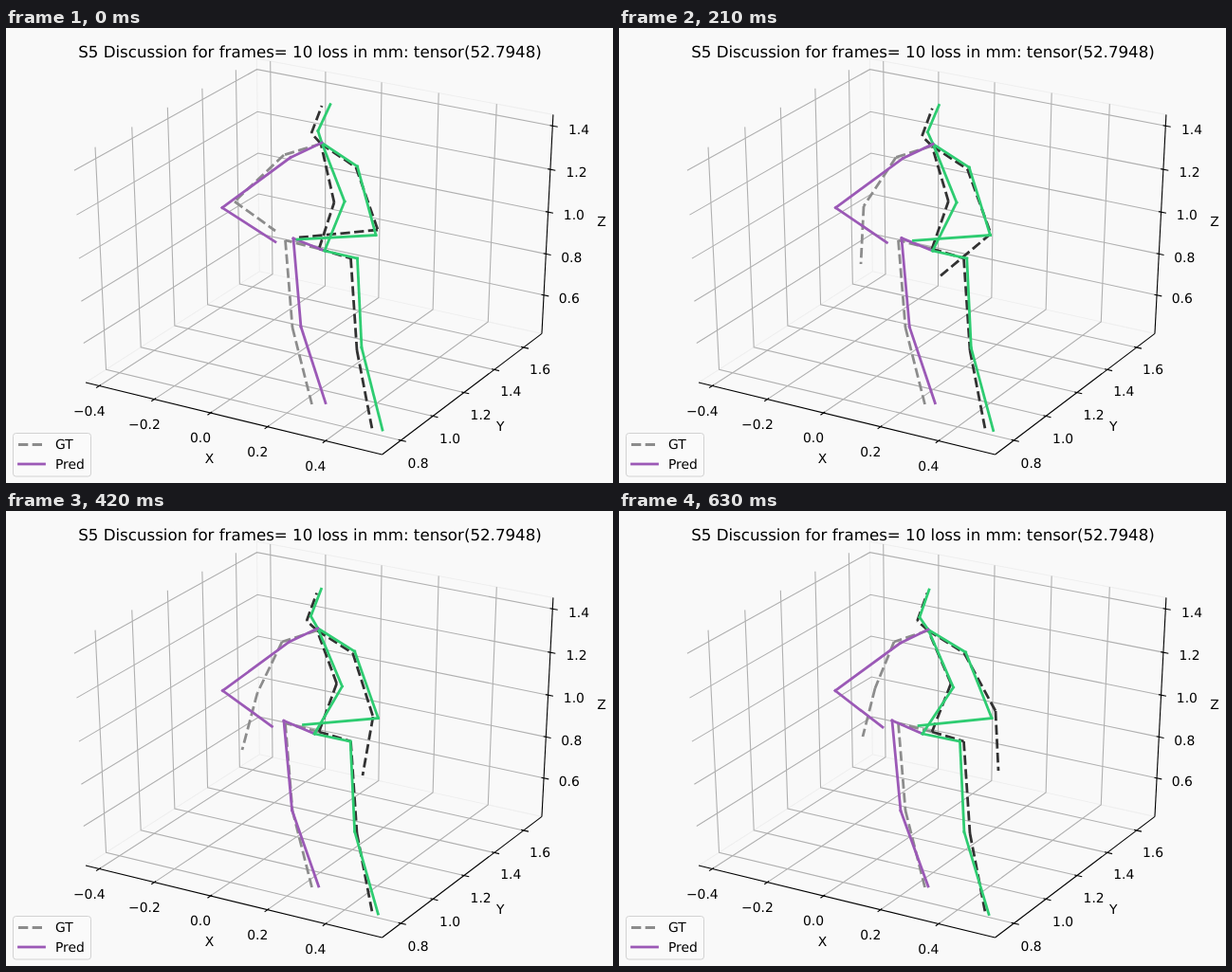
Write an HTML page that moves like this. It is 640 by 480 pixels and loops after 700 ms.

```html
<!DOCTYPE html>
<html lang="en">
<head>
<meta charset="utf-8">
<title>Pose comparison</title>
<style>
html, body { margin: 0; height: 100%; overflow: hidden; background: #f9f9f9; }
svg { display: block; font: 13.89px "DejaVu Sans", sans-serif; text-rendering: geometricPrecision; }
path { fill: none; stroke-width: 1.1; }
.c { text-anchor: middle; }
.bone { stroke-width: 2.78; stroke-linecap: square; }
.dash { stroke-linecap: butt; stroke-dasharray: 10.3 4.4; }
</style>
</head>
<body>
<svg width="640" height="480" viewBox="0 0 640 480">
  <g id="axes"></g>
  <g id="bones"></g>
  <text class="c" x="320.5" y="31" font-size="16.67">S5 Discussion for frames= 10 loss in mm: tensor(52.7948)</text>
  <rect x="7.5" y="427.5" width="82" height="45.5" rx="3" fill="#fafafa" stroke="#d2d2d2"/>
  <path class="bone dash" stroke="#8c8c8c" d="M13 439.5H41"/>
  <path class="bone" stroke="#9b59b6" d="M13.5 460H40.5"/>
  <text x="52" y="444">GT</text>
  <text x="52" y="465">Pred</text>
</svg>
<script>
const axes = document.getElementById('axes'), boneLayer = document.getElementById('bones');
function add(parent, tag, attrs, text = '') {
  const el = document.createElementNS('http://www.w3.org/2000/svg', tag);
  for (const k in attrs) el.setAttribute(k, attrs[k]);
  el.textContent = text;
  parent.append(el);
  return el;
}

// Perspective view of a unit cube: azimuth -60°, elevation 30°, distance 10
const C = Math.cos(Math.PI / 6), S = 0.5;
function project([x, y, z]) {
  const depth = 10 - (C * S * x - C * C * y + S * z);
  return [328.2 + 3608 * (C * x + S * y) / depth,
          234 - 2694 * (-S * S * x + S * C * y + C * z) / depth];
}
const line = (stroke, ...points) =>
  add(axes, 'path', { stroke, d: 'M' + points.map(project).join('L') });
const label = (point, drop, text) => {
  const [x, y] = project(point);
  add(axes, 'text', { class: 'c', x, y: y + drop }, text);
};
const shift = (p, dir, k) => p.map((v, i) => v + k * dir[i]);

const h = 0.5, span = 25 / 24;
const dims = [
  { name: 'X', first: -0.4, mid: 0.071, edge: s => [s, -h, -h], out: [0, -1, -1], tick: [0, -1, 0],
    grid: s => [[s, -h, -h], [s, h, -h], [s, h, h]] },
  { name: 'Y', first: 0.8, mid: 1.206, edge: s => [h, s, -h], out: [1, 0, -1], tick: [1, 0, 0],
    grid: s => [[h, s, -h], [-h, s, -h], [-h, s, h]] },
  { name: 'Z', first: 0.6, mid: 0.93, edge: s => [h, h, s], out: [1, 1, 0], tick: [1, 0, 0],
    grid: s => [[-h, -h, s], [-h, h, s], [h, h, s]] }
];
line('#efefef', [-h, -h, -h], [-h, h, -h], [h, h, -h]);
line('#efefef', [-h, h, -h], [-h, h, h], [h, h, h]);
for (const { name, first, mid, edge, out, tick, grid } of dims) {
  for (let i = 0; i < 5; i++) {
    const value = first + 0.2 * i, s = (value - mid) / span, p = edge(s);
    line('#b0b0b0', ...grid(s));
    line('#000', shift(p, tick, -1 / 120), shift(p, tick, 1 / 60));
    label(shift(p, out, 0.057), 11, value.toFixed(1).replace('-', '−'));
  }
  line('#000', edge(-h), edge(h));
  label(shift(edge(0), out, 0.12), 5, name);
}

// Joint: [x, y, travel x, travel y], or four points of a curved path
const truth = {
  left: '#323232', right: '#8c8c8c', style: 'bone dash',
  joints: {
    head: [333, 82, -8, 4.5], neck: [322, 111, -7.5, 5], chest: [332, 122, -6, 4],
    spine: [346, 184, 4, -2], root: [330, 233],
    lHip: [363.5, 243], lKnee: [370, 340], lFoot: [386.5, 425.5],
    rHip: [294.5, 224], rKnee: [302, 316], rFoot: [322.5, 397],
    lArm: [369, 147, -5, 3], rArm: [293, 134, -3, 4],
    lElbow: [[392, 213], [392, 217], [387, 217], [397, 211]],
    lHand: [[309, 221], [336, 264], [376, 279], [400, 274]],
    rElbow: [[241, 183], [258, 188], [265, 192], [270, 187]],
    rHand: [[284, 214], [255, 249], [249, 252], [257, 238]]
  },
  motion: i => ({ x: i / 9, y: Math.min(i / 5, 1), sway: 0, bob: 0 })
};
const guess = {
  left: '#2ecc71', right: '#9b59b6', style: 'bone',
  joints: {
    head: [342, 80.5, -15, 2.5], neck: [329, 108.5, -12, 3.5], chest: [333, 121, -7, 4],
    spine: [357, 183, -4.5, 3], root: [336, 235, -16],
    lHip: [370.5, 243, -11], lKnee: [375, 337, -11, 1.5], lFoot: [397, 424, -7, 1.5],
    rHip: [303, 222, -15, -1], rKnee: [311, 315, -14, 1], rFoot: [337, 395.5, -11, 0.5],
    lArm: [370.5, 146, -5, 3], lElbow: [390, 218.5, 3], lHand: [307, 223, 9, 3.5],
    rArm: [300, 136.5, -3, 2.5], rElbow: [228, 189.5], rHand: [284, 225.5, -6, 2.5]
  },
  // The estimate drifts with a jolt every third step
  motion: i => {
    const jolt = 0.5 + 0.5 * Math.cos(2 * Math.PI * (i - 1.3) / 3);
    const drift = i / 9 + 0.1 * jolt;
    return { x: drift, y: drift, sway: Math.sin(Math.PI * i / 9) * (0.6 - 2 * jolt), bob: 1.3 * jolt };
  }
};
const limbs = [
  'root rHip rKnee rFoot', 'root lHip lKnee lFoot', 'root spine chest neck head',
  'chest lArm lElbow lHand', 'chest rArm rElbow rHand'
].map(s => s.split(' '));

// Cubic through four evenly spaced points, u from 0 to 3
function curve([a, b, c, d], u) {
  const p = u - 1, q = u - 2, r = u - 3;
  return a.map((_, k) => (-a[k] * p * q * r + 3 * b[k] * u * q * r - 3 * c[k] * u * p * r + d[k] * u * p * q) / 6);
}
function place({ joints, motion }, name, step) {
  const joint = joints[name];
  if (joint[0].length) return curve(joint, step / 3);
  const [x, y, dx = 0, dy = 0] = joint, m = motion(step);
  const isLower = /root|Hip|Knee|Foot/.test(name);
  return [x + dx * m.x + (isLower ? 0 : m.sway), y + dy * m.y + m.bob * (isLower ? 0.4 : 1)];
}

const bones = [];
for (const body of [truth, guess])
  for (const limb of limbs)
    for (let i = 1; i < limb.length; i++) {
      const stroke = limb[i][0] === 'r' ? body.right : body.left;
      const el = add(boneLayer, 'path', { class: body.style, stroke });
      bones.push({ el, body, from: limb[i - 1], to: limb[i] });
    }

const start = performance.now();
function draw() {
  const step = Math.floor((performance.now() - start) / 70) % 10;
  for (const { el, body, from, to } of bones)
    el.setAttribute('d', `M${place(body, from, step)}L${place(body, to, step)}`);
  requestAnimationFrame(draw);
}
draw();
</script>
</body>
</html>
```
